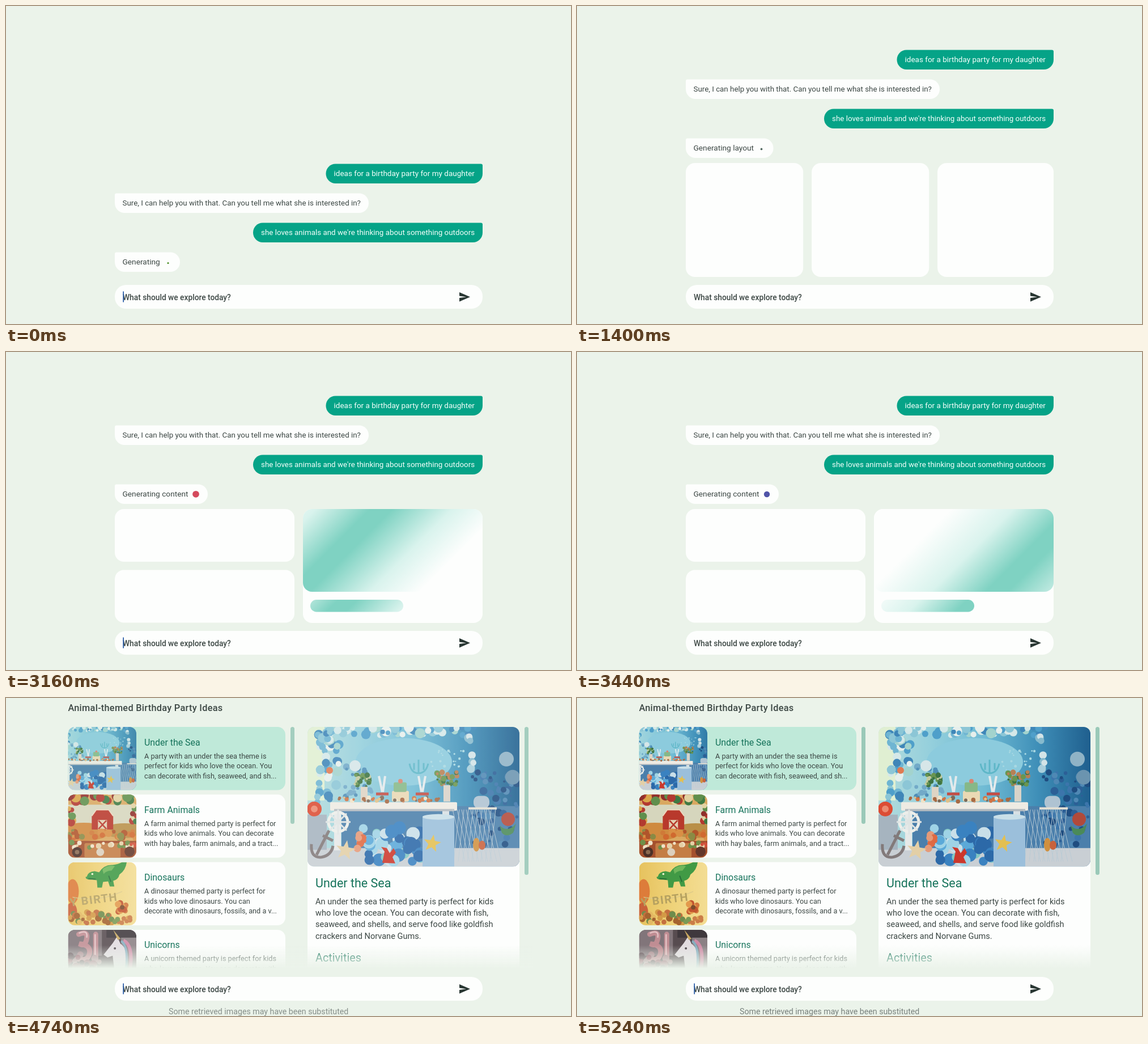
Recreate the animation shown at these times as an HTML page. Size 997 px wide and 561 px high, loop 5280 ms.

```html
<!DOCTYPE html>
<html lang="en">
<head>
<meta charset="utf-8">
<style>
html, body { margin: 0; width: 100%; height: 100%; overflow: hidden; background: #ebf3ea; }
svg { display: block; width: 997px; height: 561px; font-family: Roboto, "Open Sans", sans-serif; }
</style>
</head>
<body>
<svg id="stage" viewBox="0 0 997 561"></svg>
<script>
const LOOP = 5280, BG = '#ebf3ea', WHITE = '#fdfefd', GREEN = '#05a387', INK = '#3c4744', TEAL = '#16735b';
const clamp = v => Math.max(0, Math.min(1, v));
const span = (t, a, b) => clamp((t - a) / (b - a));
const easeOut = k => 1 - (1 - k) ** 3;
const easeInOut = k => k * k * (3 - 2 * k);
const mix = (a, b, k) => a + (b - a) * k;
const $ = id => document.getElementById(id);
const set = (node, attrs) => { for (const k in attrs) node.setAttribute(k, attrs[k]); };

const rect = (x, y, w, h, fill, r = 0, extra = '') =>
  `<rect x="${x}" y="${y}" width="${w}" height="${h}" rx="${r}" fill="${fill}" ${extra}/>`;
const circle = (x, y, r, fill, extra = '') => `<circle cx="${x}" cy="${y}" r="${r}" fill="${fill}" ${extra}/>`;
const ellipse = (x, y, rx, ry, fill) => `<ellipse cx="${x}" cy="${y}" rx="${rx}" ry="${ry}" fill="${fill}"/>`;
const path = (d, fill, extra = '') => `<path d="${d}" fill="${fill}" ${extra}/>`;
const stroke = (d, color, width, extra = '') => path(d, 'none', `stroke="${color}" stroke-width="${width}" ${extra}`);
const text = (x, y, size, fill, s, extra = '') =>
  `<text x="${x}" y="${y}" font-size="${size}" fill="${fill}" ${extra}>${s}</text>`;
const lines = (x, y, step, size, rows) => rows.map((s, i) => text(x, y + i * step, size, INK, s)).join('');
const gradient = (id, colors, extra = '') => `<linearGradient id="${id}" ${extra}>` +
  colors.map((c, i) => `<stop offset="${i / (colors.length - 1)}" stop-color="${c}"/>`).join('') + '</linearGradient>';

// Speech bubble with one sharp top corner
function bubblePath(x, y, w, h, sharpRight) {
  const r = 17, [a, b] = sharpRight ? [r, 3] : [3, r];
  return `M${x + a} ${y}H${x + w - b}a${b} ${b} 0 0 1 ${b} ${b}V${y + h - r}a${r} ${r} 0 0 1 ${-r} ${r}` +
    `H${x + r}a${r} ${r} 0 0 1 ${-r} ${-r}V${y + a}a${a} ${a} 0 0 1 ${a} ${-a}z`;
}

function random(seed) {
  return () => (seed = (seed * 16807) % 2147483647) / 2147483647;
}
function balloons(seed, n, x, y, w, h, r0, r1, colors) {
  const rnd = random(seed * 7919);
  return Array.from({ length: n }, () =>
    circle((x + w * rnd()).toFixed(1), (y + h * rnd()).toFixed(1), (r0 + (r1 - r0) * rnd()).toFixed(1),
      colors[Math.floor(rnd() * colors.length)])).join('');
}
const star = (x, y, r, fill) => {
  let d = '';
  for (let i = 0; i < 10; i++) {
    const a = i * Math.PI / 5 - 1.4, q = i % 2 ? r * .42 : r;
    d += (i ? 'L' : 'M') + (x + q * Math.cos(a)).toFixed(1) + ' ' + (y + q * Math.sin(a)).toFixed(1);
  }
  return path(d + 'z', fill);
};

function seaScene() {
  const arch = ['#d5e8e8', '#8cc6d6', '#4f9fca', '#a3d3cd', '#e6efec', '#6fb5d2', '#3f86b8'];
  const coral = ['#2c5f96', '#3c75ab', '#1f4d80', '#4f88b4'];
  let net = '';
  for (let i = 0; i < 9; i++) net += `M${268 + i * 8} 146l-10 92M${256 + i * 8} 146l22 92`;
  return rect(0, 0, 374, 247, 'url(#water)') +
    ellipse(170, 62, 85, 42, '#8ccbdd') + rect(60, 140, 314, 82, '#4b7fab') +
    rect(0, 214, 374, 33, '#c9cfd4') +
    balloons(11, 70, 290, 80, 84, 132, 2, 7, coral) +
    balloons(5, 26, 64, 70, 50, 60, 2, 6, ['#4f8fb8', '#72aac8']) +
    rect(0, 0, 30, 130, '#e0efd2') + rect(0, 155, 34, 62, '#a6b4bf') +
    balloons(7, 44, 16, 0, 42, 140, 5, 9, arch) +
    balloons(8, 52, 32, 0, 262, 15, 4, 9, arch) +
    balloons(23, 8, 284, 8, 10, 74, 5, 8, ['#a9cfdc', '#d3e4e7', '#86bacd']) +
    circle(39, 77, 6, '#e07b52') + circle(12, 145, 13, '#dc4c34') + circle(12, 145, 6, '#ec8a70') +
    circle(351, 57, 13, '#8fb3c6') + circle(362, 89, 13, '#6b94af') + circle(84, 69, 10, '#d6e6e8') +
    stroke('M180 65q3 17 16 17t17-17M196 58v24M188 64v12M205 64v12', '#5fb7c8', 3) +
    balloons(31, 22, 218, 40, 62, 36, 1, 2.5, ['#a8d8e2']) +
    rect(47, 140, 12, 78, '#e6e9e8') + rect(238, 142, 12, 70, '#d8e0e4') +
    balloons(41, 48, 92, 178, 108, 60, 7, 12, ['#5ba9d8', '#3a82c0', '#9fd3e6', '#83c8c4', '#c9dfe8', '#2c69a8']) +
    balloons(44, 7, 88, 186, 16, 30, 4, 7, ['#df6a42', '#e59a78']) +
    rect(40, 133, 224, 15, '#eeebe3', 2) + rect(47, 145, 212, 4, '#b3bbc0') +
    balloons(51, 30, 82, 84, 36, 22, 2, 5, ['#3d7444', '#6a9550', '#c2caa0']) +
    balloons(52, 30, 228, 80, 36, 22, 2, 5, ['#3d7444', '#6a9550', '#b87f54']) +
    rect(94, 106, 12, 26, '#ded4c4') + rect(240, 103, 12, 29, '#d8d3c8') +
    rect(149, 113, 30, 19, '#ead9b4', 3) + rect(152, 98, 23, 17, '#86b888', 3) + circle(164, 96, 4, '#d98570') +
    stroke('M126 87l6 28M137 87l-4 28M196 87l5 28M208 87l-5 28', '#e3eaec', 4) +
    rect(121, 116, 22, 5, '#c34e45') + rect(191, 116, 23, 5, '#c34e45') +
    balloons(61, 40, 55, 124, 190, 8, 2, 4, ['#cf7446', '#dfc088', '#f0e4c8', '#a66a44', '#7d6a58']) +
    circle(54, 168, 17, 'none', 'stroke="#eceeea" stroke-width="5"') +
    stroke('M54 146v44M32 168h44M39 153l30 30M69 153l-30 30', '#dfe4e3', 3) +
    stroke('M38 183L16 226M7 207q-2 25 18 23q17-3 20-20M27 192l18 9', '#827a7a', 5) +
    star(67, 218, 18, '#e3cfa6') + stroke(net, '#b9cbd5', .9) +
    rect(203, 158, 56, 89, '#9bbfdb') + ellipse(231, 159, 28, 5, '#c9dfe8') + star(220, 206, 16, '#e3bf52') +
    rect(293, 122, 28, 22, '#afc3d2', 9) + rect(284, 142, 50, 4, '#e2dfd4') +
    path('M132 240l4-20-6-8 10 2 5 9 7-9 4 8-6 8 5 11z', '#cc382c') +
    ellipse(298, 208, 6, 12, '#cf9040') + ellipse(308, 209, 6, 8, '#c8623d') +
    circle(354, 163, 12, '#b04a3b') + path('M339 174q14 14 29-3l-5 16q-12 9-20 0z', '#4a8a58');
}
function farmScene() {
  const party = ['#b23a30', '#d9a548', '#5f8f4c', '#e2d2a0', '#3f7a43', '#8f2f2b'];
  return rect(0, 0, 121, 112, '#d9a860') + rect(0, 18, 121, 38, '#d6d6bd') +
    ellipse(28, 66, 46, 16, '#cf8a3f') + ellipse(100, 64, 40, 13, '#b98f48') +
    balloons(17, 28, 0, 0, 121, 13, 6, 10, party) + balloons(19, 9, 0, 16, 8, 40, 4, 8, party) +
    balloons(20, 7, 112, 18, 9, 30, 4, 7, party) +
    path('M42 62V38l8-11h22l8 11v24z', '#b8392c') + stroke('M42 38l8-11h22l8 11', '#ecd6be', 2) +
    rect(53, 45, 16, 17, '#e2cfb2') + stroke('M54 46l14 15M68 46L54 61', '#b8392c', 2.5) +
    balloons(29, 30, 0, 64, 121, 16, 3, 7, ['#d0692f', '#d98f45', '#b0552b', '#8a8a44', '#cf7a38']) +
    rect(0, 82, 121, 30, '#a4502d') + rect(29, 86, 64, 26, '#c47d45', 3) +
    balloons(37, 22, 5, 84, 112, 10, 2, 5, ['#e5d0a6', '#d0503a', '#efe2c6', '#6f8f48']) +
    circle(16, 102, 9, '#4a3027') + circle(16, 102, 4, '#8a6a50') + circle(109, 101, 9, '#63372a') + circle(57, 102, 7, '#dccfbd');
}
function dinoScene() {
  return rect(0, 0, 121, 112, 'url(#yellowWall)') +
    path('M33 26q2-9 14-10l8 2q9-14 24-13q10-1 17-5h8q-2 15-13 22q-2 9-11 11l2 10h-8l-3-9-9 1-2 10h-8l-1-13-8-1q-12 1-12-5z', '#419a45') +
    path('M61 13q9-9 22-6l-6 8q-9 0-14 6z', '#6fb75c') + circle(43, 21, 1.8, '#f4f2d0') +
    stroke('M36 29l13 1M72 24l4 11', '#276f38', 2) +
    ellipse(8, 52, 11, 22, '#dd7c3a') + ellipse(6, 88, 10, 16, '#c8623a') +
    stroke('M8 62Q52 72 96 52', '#dcc98a', 1.2) +
    text(4, 78, 20, '#b5a160', 'Y BIRTH', 'font-weight="700" letter-spacing="1.5" transform="rotate(-7 8 78)"') +
    balloons(71, 38, 3, 88, 76, 20, 3, 6, ['#6f8c4c', '#d39a46', '#c46f3f', '#a4632f', '#e3b862']) +
    balloons(72, 12, 88, 72, 16, 16, 4, 6, ['#d2773d', '#c2552f', '#e39a4c']) + circle(96, 80, 4, '#7c4c2c') +
    balloons(73, 9, 80, 96, 36, 14, 3, 5, ['#7a9a54', '#dca052', '#cb7d48']);
}
function unicornScene() {
  return rect(0, 0, 121, 112, '#574c50') + rect(0, 0, 60, 46, '#81757a') + rect(68, 0, 53, 14, '#3f383d') +
    rect(94, 14, 27, 60, '#8b8084') +
    stroke('M19 8q17-7 14 8t-13 9q21 2 18 17t-22 9M49 8v45', '#c08d93', 9, 'stroke-linecap="round"') +
    stroke('M19 6q17-7 14 8M48 8v40', '#e3c2c4', 2.5) +
    balloons(81, 22, 0, 42, 58, 28, 4, 7, ['#8f5562', '#cdb0b5', '#55424a', '#a9868c']) +
    path('M63 44l16-20 8-12 6 13q14 8 12 45H82l-3-24-9 3z', '#e2dce0') + path('M88 18l-8-18 13 16z', '#c9a860') +
    stroke('M98 19q18 8 12 51', '#cf8aa5', 6) + stroke('M94 20q13 8 9 48', '#86aebf', 4) +
    circle(83, 33, 2, '#443b42');
}
const symbol = (id, w, h, art) =>
  `<symbol id="${id}" viewBox="0 0 ${w} ${h}" preserveAspectRatio="xMidYMid slice">${art}</symbol>`;
const photo = (id, x, y, w, h) =>
  `<clipPath id="${id}${x}">${rect(x, y, w, h, '#000', 12)}</clipPath>` +
  `<g clip-path="url(#${id}${x})"><use href="#${id}" x="${x}" y="${y}" width="${w}" height="${h}"/></g>`;

const waveStops = [[0, '#fdfefd'], [.25, '#d9f3ed'], [.47, '#7fd2c2'], [.56, '#7fd2c2'], [.8, '#d9f3ed'], [1, '#fdfefd']]
  .map(([o, c]) => `<stop offset="${o}" stop-color="${c}"/>`).join('');
const wave = id => `<linearGradient id="${id}" gradientUnits="userSpaceOnUse">${waveStops}</linearGradient>`;

const ideas = [
  ['Under the Sea', 'sea', ['A party with an under the sea theme is', 'perfect for kids who love the ocean. You', 'can decorate with fish, seaweed, and sh...']],
  ['Farm Animals', 'farm', ['A farm animal themed party is perfect for', 'kids who love animals. You can decorate', 'with hay bales, farm animals, and a tract...']],
  ['Dinosaurs', 'dino', ['A dinosaur themed party is perfect for', 'kids who love dinosaurs. You can', 'decorate with dinosaurs, fossils, and a v...']],
  ['Unicorns', 'unicorn', ['A unicorn themed party is perfect for kids', 'who love unicorns. You can decorate with']]
];
const ideaTop = i => 51 + i * 119.3;
const ideaCard = ([title, , rows], i) => {
  const y = ideaTop(i);
  return rect(109.5, y, 383.5, 111.5, i ? WHITE : '#bfe9d9', 14) +
    text(244, y + 32.5, 15.9, TEAL, title) + lines(244, y + 55.5, 17.6, 12.7, rows);
};

$('stage').innerHTML = `
<defs>
  ${gradient('water', ['#b4dcdc', '#94cfdc', '#70bbd4', '#3f8fb8', '#1f5f8e'])}
  ${gradient('yellowWall', ['#e6c25e', '#efd37a', '#f3dd94'])}
  <linearGradient id="fade" x2="0" y2="1"><stop stop-color="${BG}" stop-opacity="0"/><stop offset="1" stop-color="${BG}"/></linearGradient>
  ${wave('bigWave')}${wave('smallWave')}
  ${symbol('sea', 374, 247, seaScene())}${symbol('farm', 121, 112, farmScene())}
  ${symbol('dino', 121, 112, dinoScene())}${symbol('unicorn', 121, 112, unicornScene())}
</defs>
${rect(0, 0, 997, 561, BG)}
<g id="chat">
  <g id="thread">
    ${path(bubblePath(564.5, 278.5, 276.5, 34.5, true), GREEN)}
    ${text(578.5, 300, 13.5, '#f4fffb', 'ideas for a birthday party for my daughter')}
    ${path(bubblePath(192, 330.5, 448, 34.5, false), WHITE)}
    ${text(205.5, 351.7, 13.35, INK, 'Sure, I can help you with that. Can you tell me what she is interested in?')}
    ${path(bubblePath(436, 382.5, 405, 34.5, true), GREEN)}
    ${text(450, 404, 13.37, '#f4fffb', "she loves animals and we're thinking about something outdoors")}
    <path id="statusBubble" fill="${WHITE}"/>
    ${text(205.5, 456, 13.7, INK, '', 'id="status"')}
    <circle id="dot"/>
  </g>
  <g id="cards" fill="${WHITE}"><rect/><rect/><rect/></g>
  <g id="skeleton">${rect(524, 277, 317, 146, 'url(#bigWave)', 16)}${rect(537, 437, 164, 21.5, 'url(#smallWave)', 10.7)}</g>
</g>
<g id="result">
  ${text(109.5, 23.3, 16.3, INK, 'Animal-themed Birthday Party Ideas', 'font-weight="500" letter-spacing=".3"')}
  ${ideas.map(ideaCard).join('')}
  ${rect(532, 51, 374, 450, WHITE, 14)}
  ${text(546, 334, 21.5, TEAL, 'Under the Sea')}
  ${lines(546, 364, 20.2, 14.55, ['An under the sea themed party is perfect for kids', 'who love the ocean. You can decorate with fish,', 'seaweed, and shells, and serve food like goldfish', 'crackers and Norvane Gums.'])}
  ${text(546, 464.5, 19.8, TEAL, 'Activities')}
  <g id="media">
    ${ideas.map(([, id], i) => photo(id, 109.5, ideaTop(i), 120.5, 111.5)).join('')}
    ${photo('sea', 532, 51, 374, 246.5)}
    ${rect(502, 51, 7, 171, '#9ac9b8', 3.5)}${rect(915, 51, 7, 261, '#9ac9b8', 3.5)}
    ${text(287, 558, 14.2, '#77807c', 'Some retrieved images may have been substituted')}
  </g>
  ${rect(100, 436, 830, 41, 'url(#fade)')}${rect(100, 476, 830, 66, BG)}
</g>
${rect(192, 492, 649, 42, WHITE, 20)}
${text(206, 518.7, 13.75, INK, 'What should we explore today?', 'font-weight="500"')}
${rect(206.3, 503.5, 1.7, 19, '#2458a6', 0, 'id="caret"')}
${path('M800 505L819 513.2L800 521.5V515L812 513.2L800 511.5z', '#293733')}`;

const phases = [
  [0, 'Generating', 115], [820, 'Generating layout', 154.5],
  [1900, 'Generating template', 171], [2850, 'Generating content', 164]
];
const dotColors = ['#4c9026', '#536b62', '#d44a5d', '#5054a8'];
const cardNodes = [...$('cards').children];

function cardRects(t, grow) {
  const second = easeOut(span(t, 720, 1080)), third = easeOut(span(t, 1050, 1500));
  const unit = (649 - 15 * (second + third)) / (1 + second + third);
  const top = 478 - 201 * grow, height = 201 * grow;
  const x2 = 192 + unit + 15 * second, x3 = x2 + unit * second + 15 * third;
  const columns = [[192, top, unit, height], [x2, top, unit * second, height], [x3, top, unit * third, height]];
  const split = [[192, 277, 317, 93], [192, 384.5, 317, 93], [524, 277, 317, 201]];
  const k = easeInOut(span(t, 2800, 3120));
  return columns.map((box, i) => box.map((v, j) => mix(v, split[i][j], k)));
}

// Diagonal light band; peak and reach are measured along x + y
function placeWave(id, x, y, peak, reach) {
  const a = (peak - reach) / 2, b = (peak + reach) / 2;
  set($(id), { x1: x + a, y1: y + a, x2: x + b, y2: y + b });
}

function draw(t) {
  $('chat').setAttribute('opacity', 1 - span(t, 3860, 4100));
  const grow = easeInOut(span(t, 620, 980));
  $('thread').setAttribute('transform', `translate(0 ${-201 * grow})`);

  const [, label, width] = phases.filter(p => t >= p[0]).pop();
  $('status').textContent = label;
  $('statusBubble').setAttribute('d', bubblePath(192, 434.5, width, 34.5, false));
  const turn = t / 1300, swell = 1 - Math.cos(turn * 2 * Math.PI);
  set($('dot'), {
    cx: 192 + width - 21, cy: 453.5 - swell * .9, r: 1.6 + 2.25 * swell,
    fill: dotColors[Math.min(3, Math.round(turn))]
  });

  cardRects(t, grow).forEach(([x, y, w, h], i) =>
    set(cardNodes[i], { x, y, width: w, height: h, rx: Math.min(16, w / 2, h / 2) }));

  $('skeleton').setAttribute('opacity', span(t, 3080, 3160));
  const peak = (355 + .8 * (t - 3440) + 1120) % 900 - 220;
  placeWave('bigWave', 524, 277, peak, 220);
  placeWave('smallWave', 537, 437, peak * .46, 190);

  $('result').setAttribute('opacity', t < 4400 ? 0 : clamp(.26 + (t - 4400) / 400));
  $('media').setAttribute('opacity', span(t, 4460, 4780));
  $('caret').setAttribute('opacity', t >= 3780 || (t + 990) % 1060 >= 530 ? 1 : 0);
}

const start = performance.now();
function tick() {
  draw((performance.now() - start) % LOOP);
  requestAnimationFrame(tick);
}
draw(0);
requestAnimationFrame(tick);
</script>
</body>
</html>
```
